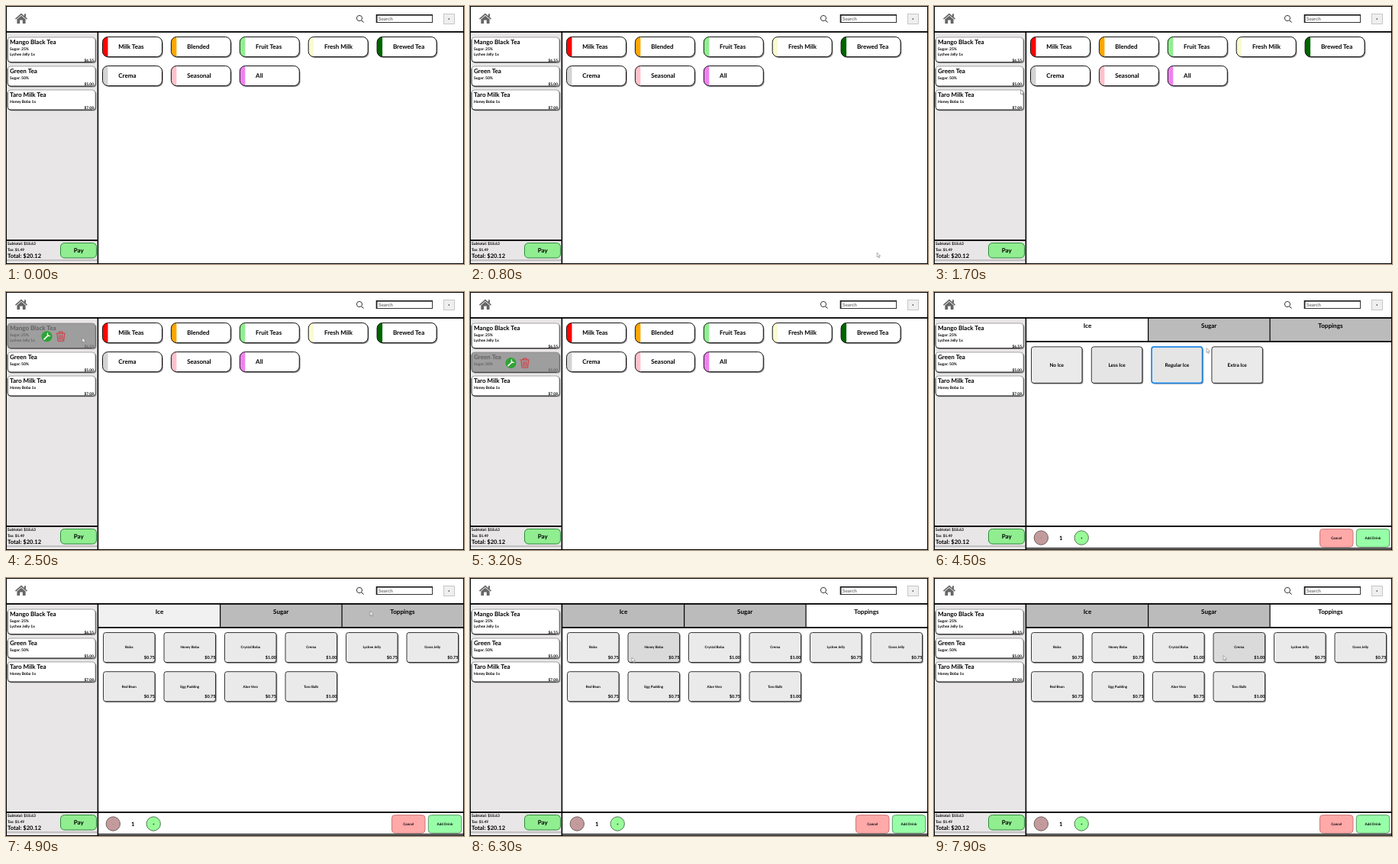
An HTML page that plays this animation: 600x338 px, repeating every 8 s.

```html
<!DOCTYPE html>
<html lang="en">
<head>
<meta charset="utf-8">
<title>Tea shop register</title>
<style>
  html, body { margin: 0; width: 100%; height: 100%; overflow: hidden; background: #fff; }
  svg { display: block; width: 100vw; height: 100vh; }
  text {
    font-family: Lato, "Open Sans", sans-serif; font-weight: 700;
    text-rendering: geometricPrecision; white-space: pre;
  }
</style>
</head>
<body>
<svg id="stage" viewBox="0 0 600 338"></svg>
<script>
const NS = 'http://www.w3.org/2000/svg';
const LOOP = 8000, STEP = 100;
const EDIT_AT = 3600, TOPPINGS_AT = 4800;
const stage = document.getElementById('stage');

function el(parent, tag, attrs = {}) {
  const node = document.createElementNS(NS, tag);
  for (const k in attrs) node.setAttribute(k, attrs[k]);
  parent.appendChild(node);
  return node;
}
const group = (p, attrs) => el(p, 'g', attrs);
const rect = (p, x, y, width, height, fill, more) =>
  el(p, 'rect', { x, y, width, height, fill, ...more });
const path = (p, d, more) => el(p, 'path', { d, fill: 'none', ...more });
const circle = (p, cx, cy, r, fill, more) => el(p, 'circle', { cx, cy, r, fill, ...more });
function text(p, str, x, y, size, anchor = 'start', fill = '#000') {
  el(p, 'text', { x, y, 'font-size': size, 'text-anchor': anchor, fill }).textContent = str;
}
function shadow(p, x, y, w, h, rx) {
  rect(p, x + 1.5, y + 1.5, w, h, '#000', { rx, opacity: 0.28 });
  rect(p, x + 0.8, y + 0.9, w, h, '#000', { rx, opacity: 0.4 });
}
const inside = (b, x, y) => x > b.x && x < b.x + b.w && y > b.y && y < b.y + b.h;

// Header
rect(stage, 0, 0, 600, 338, '#fff');
path(stage, 'M12 16.6 20 9.6 28 16.6 27 17.7 20 11.7 13 17.7Z', { fill: '#666' });
path(stage, 'M14.4 17.4 20 12.7 25.6 17.4V23H21.8V18.6H18.2V23H14.4Z', { fill: '#666' });
rect(stage, 24, 10.3, 2, 4, '#666');
circle(stage, 463, 16, 3.6, 'none', { stroke: '#222', 'stroke-width': 0.9 });
path(stage, 'M465.7 18.7 468.6 21.6', { stroke: '#222', 'stroke-width': 1 });
rect(stage, 486, 12, 72.5, 9.5, '#fff', { stroke: '#333' });
path(stage, 'M485.3 22V11.7H559', { stroke: '#111', 'stroke-width': 1.2 });
text(stage, 'Search', 488, 18.6, 6.3, 'start', '#757575');
rect(stage, 573.5, 10.5, 14, 13, '#efefef', { stroke: '#bbb', 'stroke-width': 0.8 });
circle(stage, 580.3, 17, 0.8, '#111');

// Order column
rect(stage, 0, 34, 120, 304, '#e8e6e6');
const orders = [
  { y: 41, h: 32.5, lines: ['Mango Black Tea', 'Sugar: 25%', 'Lychee Jelly 1x'], price: '$6.55' },
  { y: 79, h: 26, lines: ['Green Tea', 'Sugar: 50%'], price: '$5.00' },
  { y: 110, h: 26, lines: ['Taro Milk Tea', 'Honey Boba 1x'], price: '$7.08' }
].map(o => {
  const box = { x: 2, y: o.y, w: 115, h: o.h };
  shadow(stage, box.x, box.y, box.w, box.h, 4);
  rect(stage, box.x, box.y, box.w, box.h, '#fff', { rx: 4, stroke: '#555', 'stroke-width': 0.5 });
  path(stage, `M2.2 ${o.y + 3}V${o.y + o.h - 4}Q2.2 ${o.y + o.h} 6 ${o.y + o.h}H113`,
    { stroke: '#222', 'stroke-width': 0.8 });
  text(stage, o.lines[0], 5, o.y + 9, 8.1);
  o.lines.slice(1).forEach((s, i) => text(stage, s, 5, o.y + 16.7 + 7.3 * i, 5));
  text(stage, o.price, 115, o.y + o.h - 0.9, 4.9, 'end');

  const over = group(stage, { opacity: 0 });
  const mid = o.y + o.h / 2 + 1;
  rect(over, box.x, box.y, box.w, box.h, '#808080', { rx: 4, opacity: 0.76 });
  circle(over, 53.5, mid, 7, '#2fa336');
  path(over, `M50 ${mid + 3.6}L55.3 ${mid - 1.5}`, { stroke: '#fff', 'stroke-width': 1.7, 'stroke-linecap': 'round' });
  path(over, `M55 ${mid - 4.5}A2.2 2.2 0 1 0 57.8 ${mid - 1}`, { stroke: '#fff', 'stroke-width': 1.2 });
  path(over, `M65.6 ${mid - 4}H78M69.5 ${mid - 4}V${mid - 6}H74.2V${mid - 4}M67 ${mid - 3}L68 ${mid + 6}H75.6L76.7 ${mid - 3}`
    + `M69.8 ${mid - 2}V${mid + 4.5}M71.9 ${mid - 2}V${mid + 4.5}M74 ${mid - 2}V${mid + 4.5}`,
    { stroke: '#d8353a', 'stroke-width': 1 });
  return { box, show: f => over.setAttribute('opacity', f) };
});

rect(stage, 0, 306, 120, 1.8, '#000');
text(stage, 'Subtotal: $18.63', 2, 313, 5);
text(stage, 'Tax: $1.49', 2, 320.6, 4.8);
text(stage, 'Total: $20.12', 2, 329.8, 7.6);
rect(stage, 0, 332.6, 120, 0.8, '#888');
rect(stage, 71.5, 310.5, 47, 19.5, '#90ee90', { rx: 5, stroke: '#2d8a3a' });
text(stage, 'Pay', 95.3, 322.8, 8, 'middle');

// Category menu
const menu = group(stage);
[['Milk Teas', '#f00'], ['Blended', '#ffa500'], ['Fruit Teas', '#90ee90'], ['Fresh Milk', '#fafad2'],
 ['Brewed Tea', '#006400'], ['Crema', '#d3d3d3'], ['Seasonal', '#ffc0cb'], ['All', '#ee82ee']]
.forEach(([name, color], i) => {
  const x = 126.5 + 89.9 * (i % 5), y = i < 5 ? 40.5 : 78.5;
  shadow(menu, x, y, 78, 26, 7);
  rect(menu, x, y, 78, 26, '#fff', { rx: 7 });
  path(menu, `M${x + 7} ${y}A7 7 0 0 0 ${x} ${y + 7}V${y + 19}A7 7 0 0 0 ${x + 7} ${y + 26}Z`, { fill: color });
  rect(menu, x, y, 78, 26, 'none', { rx: 7, stroke: '#111' });
  text(menu, name, x + 20.8, y + 15.3, 8);
});

// Drink editor
const editor = group(stage);
const tabs = ['Ice', 'Sugar', 'Toppings'].map((name, i) => {
  const tab = rect(editor, 121 + 159.5 * i, 34, 159.5, 31, '#bbb');
  text(editor, name, 201 + 159.2 * i, 47, 8.1, 'middle');
  return tab;
});
[280, 439.5].forEach(x => rect(editor, x, 34, 1.2, 31, '#000'));
rect(editor, 121, 64, 479, 1.8, '#000');
rect(editor, 121, 306, 479, 1.8, '#000');
rect(editor, 121, 335, 479, 1.3, '#000');
circle(editor, 140.3, 322, 9.2, '#c39b9c', { stroke: '#655', 'stroke-width': 0.9 });
text(editor, '-', 140.3, 323.6, 5, 'middle', '#766');
text(editor, '1', 166.3, 324.6, 7.5, 'middle');
circle(editor, 193.2, 322, 9.2, '#98fb98', { stroke: '#486848', 'stroke-width': 0.9 });
text(editor, '+', 193.2, 323.6, 4.5, 'middle');
[['Cancel', 505.5, '#ffa9a9', '#c77'], ['Add Drink', 553.3, '#98ffa9', '#5a9a62']].forEach(([s, x, fill, stroke]) => {
  rect(editor, x, 310.5, 43.5, 23.5, fill, { rx: 4, stroke });
  text(editor, s, x + 21.7, 323.7, 4.6, 'middle');
});

function option(parent, box, name, size, price, chosen) {
  shadow(parent, box.x, box.y, box.w, box.h, 3);
  const face = rect(parent, box.x, box.y, box.w, box.h, '#eaeaea',
    { rx: 3, stroke: chosen ? '#1e88e5' : '#222', 'stroke-width': chosen ? 1.7 : 0.9 });
  text(parent, name, box.x + box.w / 2, box.y + box.h / 2 + size * 0.33, size, 'middle');
  if (price) text(parent, price, box.x + box.w, box.y + 34, 5.6, 'end');
  return { box, show: f => face.setAttribute('fill', gray(234 - 16 * f)) };
}
const icePage = group(editor);
const ices = ['No Ice', 'Less Ice', 'Regular Ice', 'Extra Ice'].map((name, i) =>
  option(icePage, { x: 127.5 + 78.8 * i, y: 71.8, w: 66.5, h: 47.5 }, name, 6.5, '', i === 2));

const toppingPage = group(editor);
const dear = ['Crystal Boba', 'Crema', 'Taro Balls'];
const toppings = ['Boba', 'Honey Boba', 'Crystal Boba', 'Crema', 'Lychee Jelly', 'Grass Jelly',
  'Red Bean', 'Egg Pudding', 'Aloe Vera', 'Taro Balls'].map((name, i) =>
  option(toppingPage, { x: 127.5 + 79.5 * (i % 6), y: i < 6 ? 71.5 : 122.7, w: 67.5, h: 39 },
    name, 4.5, dear.includes(name) ? '$1.00' : '$0.75'));

// Frame lines
rect(stage, 0.5, 0.5, 599, 337, 'none', { stroke: '#000' });
rect(stage, 0, 33, 600, 1.8, '#000');
rect(stage, 119.6, 34, 1.6, 303, '#000');

const cursor = path(stage, 'M0 0V6L1.4 4.8 2.4 7 3.4 6.5 2.5 4.4H4.4Z',
  { fill: '#fff', stroke: '#777', 'stroke-width': 0.6 });

// Pointer route: time, x, y
const route = [
  [100, 556, 323], [900, 530, 323], [1300, 300, 205], [1700, 113.5, 109.7], [1800, 114, 98],
  [2100, 126, 84], [2500, 100, 60], [2800, 80, 82], [3200, 53, 92], [3800, 53, 92],
  [4300, 240, 102], [4700, 474, 45], [4900, 477, 43.5], [5500, 150, 98], [5800, 150, 98],
  [6100, 209, 104], [6300, 212, 104], [6900, 212, 104], [7300, 290, 128], [7500, 345, 122],
  [7700, 376, 109], [7800, 379, 108], [7900, 379, 101.5]
];
function pointer(t) {
  const n = route.findIndex(k => k[0] >= t);
  if (n < 1) return (n ? route[route.length - 1] : route[0]).slice(1);
  const [a, b] = [route[n - 1], route[n]];
  const p = (t - a[0]) / (b[0] - a[0]);
  return [a[1] + (b[1] - a[1]) * p, a[2] + (b[2] - a[2]) * p];
}

const clamp = v => Math.min(1, Math.max(0, v));
function gray(v) { v = Math.round(v); return `rgb(${v},${v},${v})`; }
const visible = (node, on) => node.setAttribute('visibility', on ? 'inherit' : 'hidden');

// Hover fades over three steps
const hover = (box, t) =>
  [0, 1, 2].filter(k => inside(box, ...pointer(Math.max(0, t - k * STEP)))).length / 3;

function draw(t) {
  const editing = t >= EDIT_AT, onToppings = t >= TOPPINGS_AT;
  visible(menu, !editing);
  visible(editor, editing);
  visible(icePage, editing && !onToppings);
  visible(toppingPage, editing && onToppings);
  tabs[0].setAttribute('fill', gray(255 - 68 * clamp((t - 4800) / 500)));
  tabs[2].setAttribute('fill', gray(187 + 68 * clamp((t - 4900) / 500)));
  [...orders, ...ices, ...toppings].forEach(b => b.show(hover(b.box, t)));

  const [x, y] = pointer(t);
  cursor.setAttribute('transform', `translate(${x} ${y})`);
  visible(cursor, t >= 100 && !(t >= 3200 && t < 3900));
}

function tick() {
  draw(Math.floor(performance.now() % LOOP / STEP) * STEP);
  requestAnimationFrame(tick);
}
tick();
</script>
</body>
</html>
```
